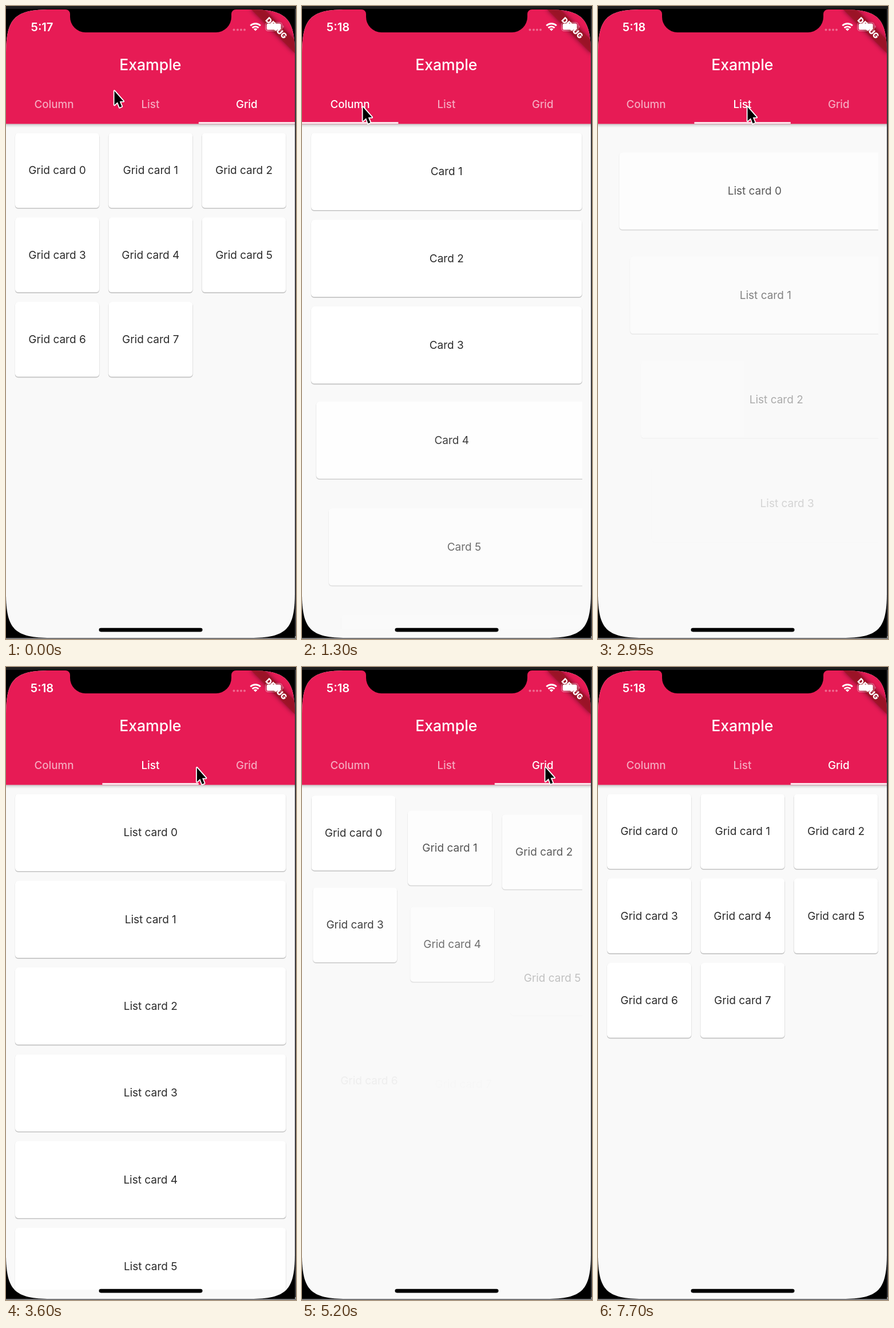
An HTML page for the animation above (7.75 s loop, 507x1104 px).

```html
<!DOCTYPE html>
<html lang="en">
<head>
<meta charset="utf-8">
<title>Tabs with animated cards</title>
<style>
  html, body { margin: 0; width: 100%; height: 100%; overflow: hidden; background: #1e1e1f; }
  svg { display: block; width: 507px; height: 1104px; font-family: Inter, Roboto, sans-serif; }
  .mid { text-anchor: middle; }
  .label { font-size: 19px; fill: #2b2b2b; }
  .tab { font-size: 18.8px; font-weight: 500; fill: #fff; }
</style>
</head>
<body>
<svg viewBox="0 0 507 1104">
  <defs>
    <clipPath id="screen">
      <path d="M0 84C0 21 15 6 78 6H427C490 6 505 21 505 84V1024C505 1087 490 1102 427 1102H78C15 1102 0 1087 0 1024Z"/>
    </clipPath>
    <clipPath id="inset"><rect x="15.5" y="218" width="474.5" height="868"/></clipPath>
    <linearGradient id="shade" x2="0" y2="1">
      <stop offset="0" stop-opacity=".24"/>
      <stop offset=".4" stop-opacity=".1"/>
      <stop offset="1" stop-opacity="0"/>
    </linearGradient>
    <filter id="blur" x="-20%" y="-80%" width="140%" height="260%"><feGaussianBlur stdDeviation="4"/></filter>
  </defs>

  <rect x="498" y="1098" width="9" height="6" fill="#8c8c8e"/>
  <rect y="1102" width="507" height="2" fill="#77777a"/>
  <rect x="505" y="5" width="2" height="1094" fill="#3b3a3d"/>
  <rect y="5" width="505" height="1097" fill="#000"/>

  <g clip-path="url(#screen)">
    <rect y="6" width="505" height="1096" fill="#f9f9f9"/>
    <g id="pages"></g>
    <rect y="205.5" width="505" height="6.5" fill="url(#shade)"/>
    <rect y="6" width="505" height="199.6" fill="#e71b55"/>
    <text class="mid" x="252.3" y="112" font-size="26.6" font-weight="500" fill="#fff">Example</text>
    <g id="tabs"></g>
    <rect id="bar" y="202.5" width="168.4" height="2.8" fill="#fff"/>

    <g transform="translate(505 6) rotate(45)">
      <rect x="-54" y="37.7" width="108" height="16.2" fill="#000" opacity=".5" filter="url(#blur)"/>
      <rect x="-60" y="37.7" width="120" height="16.2" fill="#a01526" opacity=".85"/>
      <text class="mid" y="50.5" font-size="13.4" font-weight="900" fill="#fff">DEBUG</text>
    </g>

    <text id="clock" class="mid" x="63" y="43.8" font-size="20.2" font-weight="600" fill="#fff"></text>
    <g fill="#fff" opacity=".35">
      <circle cx="398.5" cy="41.5" r="2"/><circle cx="405" cy="41.5" r="2"/>
      <circle cx="411" cy="41.5" r="2"/><circle cx="417" cy="41.5" r="2"/>
    </g>
    <g fill="none" stroke="#fff" stroke-width="2.9">
      <path d="M427.3 34.2A12.8 12.8 0 0 1 444.9 34.2"/>
      <path d="M430.6 38.1A8 8 0 0 1 441.6 38.1"/>
    </g>
    <path d="M436.1 43.5L432.8 40.3A4.6 4.6 0 0 1 439.4 40.3Z" fill="#fff"/>
    <rect x="453.7" y="28.7" width="29" height="14.6" rx="4.5" fill="none" stroke="#fff" stroke-width="1.3" opacity=".4"/>
    <rect x="455.7" y="30.5" width="25" height="11" rx="2.8" fill="#fff"/>
    <path d="M484.3 33.5Q487 36 484.3 38.5Z" fill="#fff" opacity=".5"/>
  </g>

  <path d="M104 5V6A8 8 0 0 1 112 14V19A27 27 0 0 0 139 46H367A27 27 0 0 0 394 19V14A8 8 0 0 1 402 6V5Z"/>
  <rect x="162.5" y="1084.8" width="181" height="6.6" rx="3.3"/>
  <path id="cursor" d="M1.5 1.2V25.6L7 20.4L10.6 29.8L14.4 28.2L10.7 19.2H17.3Z" stroke="#fff" stroke-width="3.6" stroke-linejoin="round" paint-order="stroke"/>
</svg>
<script>
const LOOP = 7750, WIDTH = 505, TAB = 168.4;
const $ = id => document.getElementById(id);
const clamp = v => Math.min(1, Math.max(0, v));
const mix = (a, b, k) => a + (b - a) * k;
const smooth = k => k * k * (3 - 2 * k);

function add(parent, name, attrs, text) {
  const el = document.createElementNS('http://www.w3.org/2000/svg', name);
  for (const key in attrs) el.setAttribute(key, attrs[key]);
  if (text) el.textContent = text;
  return parent.appendChild(el);
}

// cubic-bezier(.25, .1, .25, 1)
function ease(x) {
  if (x <= 0 || x >= 1) return clamp(x);
  const curve = (a, b, s) => 3 * a * s * (1 - s) ** 2 + 3 * b * s * s * (1 - s) + s ** 3;
  let lo = 0, hi = 1;
  for (let i = 0; i < 24; i++) {
    const m = (lo + hi) / 2;
    if (curve(.25, .25, m) < x) lo = m; else hi = m;
  }
  return curve(.1, 1, lo);
}

function makePage(labels, columns, w, h, pitchX, pitchY) {
  const el = add($('pages'), 'g', {});
  const box = add(el, 'g', { 'clip-path': 'url(#inset)' });
  const cards = labels.map((label, i) => {
    const x = 16 + i % columns * pitchX, y = 221.5 + Math.floor(i / columns) * pitchY;
    const card = add(box, 'g', {});
    const face = add(card, 'g', {});
    const layer = (grow, dy, fill) => add(face, 'rect', {
      x: x - grow, y: y - grow + dy, width: w + 2 * grow, height: h + 2 * grow, rx: 5.4 + grow, fill
    });
    layer(.9, .9, 'rgba(0,0,0,.055)');
    layer(.2, 1.4, 'rgba(0,0,0,.17)');
    layer(0, 0, '#fff');
    add(card, 'text', { class: 'label mid', x: x + w / 2, y: y + h / 2 + 6.6 }, label);
    return { card, face };
  });
  return { el, cards, w, h };
}

const names = (n, prefix, first) => Array.from({ length: n }, (_, i) => prefix + ' ' + (i + first));
const pages = [
  makePage(names(6, 'Card', 1), 1, 473.5, 134.5, 0, 151.3),
  makePage(names(6, 'List card', 0), 1, 473.5, 134.5, 0, 151.3),
  makePage(names(8, 'Grid card', 0), 3, 147, 130.5, 163.3, 147.3)
];
const tabs = ['Column', 'List', 'Grid'].map((name, i) =>
  add($('tabs'), 'text', { class: 'tab mid', x: 84 + i * TAB, y: 177.7 }, name));

// bar and slide are start times; each card has its own start
const step = (start, gap) => Array.from({ length: 6 }, (_, i) => start + i * gap);
const visits = [
  { from: 2, to: 0, bar: 530, slide: 636, span: 320, starts: step(600, 101), time: 440 },
  { from: 0, to: 1, bar: 2620, slide: 2655, span: 300, starts: step(2640, 80), time: 400 },
  { from: 1, to: 2, bar: 4220, slide: 4260, span: 300,
    starts: [4318, 4476, 4519, 4397, 4604, 4962, 5155, 5195], time: 900 }
];

const path = [
  [0, 188, 147], [250, 188, 147], [480, 105, 175], [1630, 105, 175], [2150, 260, 175],
  [3380, 260, 175], [3860, 424, 174], [6640, 424, 174], [6960, 446, 144],
  [7180, 446, 144], [7500, 512, 120], [LOOP, 512, 120]
];

function showPage(page, x) {
  const on = Math.abs(x) < WIDTH;
  page.el.setAttribute('display', on ? 'inline' : 'none');
  if (on) page.el.setAttribute('transform', `translate(${x} 0)`);
}

function showCard(page, { card, face }, done) {
  const left = 1 - done;
  card.setAttribute('transform', `translate(${.2 * page.w * left} ${1.13 * page.h * left})`);
  card.setAttribute('opacity', done);
  face.setAttribute('opacity', done);
}

function draw(t) {
  const visit = visits.filter(v => t >= v.bar).pop() || visits[0];
  const { from, to } = visit;
  const side = Math.sign(to - from);
  const moved = ease((t - visit.slide) / visit.span);
  const lit = ease((t - visit.bar) / 300);

  pages.forEach((page, i) => {
    showPage(page, i === to ? side * WIDTH * (1 - moved) : i === from ? -side * WIDTH * moved : WIDTH);
    page.cards.forEach((card, k) =>
      showCard(page, card, i === to ? clamp((t - visit.starts[k]) / visit.time) : 1));
  });

  $('bar').setAttribute('x', TAB * mix(from, to, lit));
  tabs.forEach((tab, i) =>
    tab.setAttribute('opacity', mix(.62, 1, i === to ? lit : i === from ? 1 - lit : 0)));
  $('clock').textContent = t < 50 ? '5:17' : '5:18';

  const n = path.findIndex(p => p[0] > t);
  const [a, b] = [path[n - 1], path[n]];
  const k = smooth((t - a[0]) / (b[0] - a[0]));
  $('cursor').setAttribute('transform', `translate(${mix(a[1], b[1], k)} ${mix(a[2], b[2], k)})`);
}

function tick() {
  draw(performance.now() % LOOP);
  requestAnimationFrame(tick);
}
draw(0);
requestAnimationFrame(tick);
</script>
</body>
</html>
```
